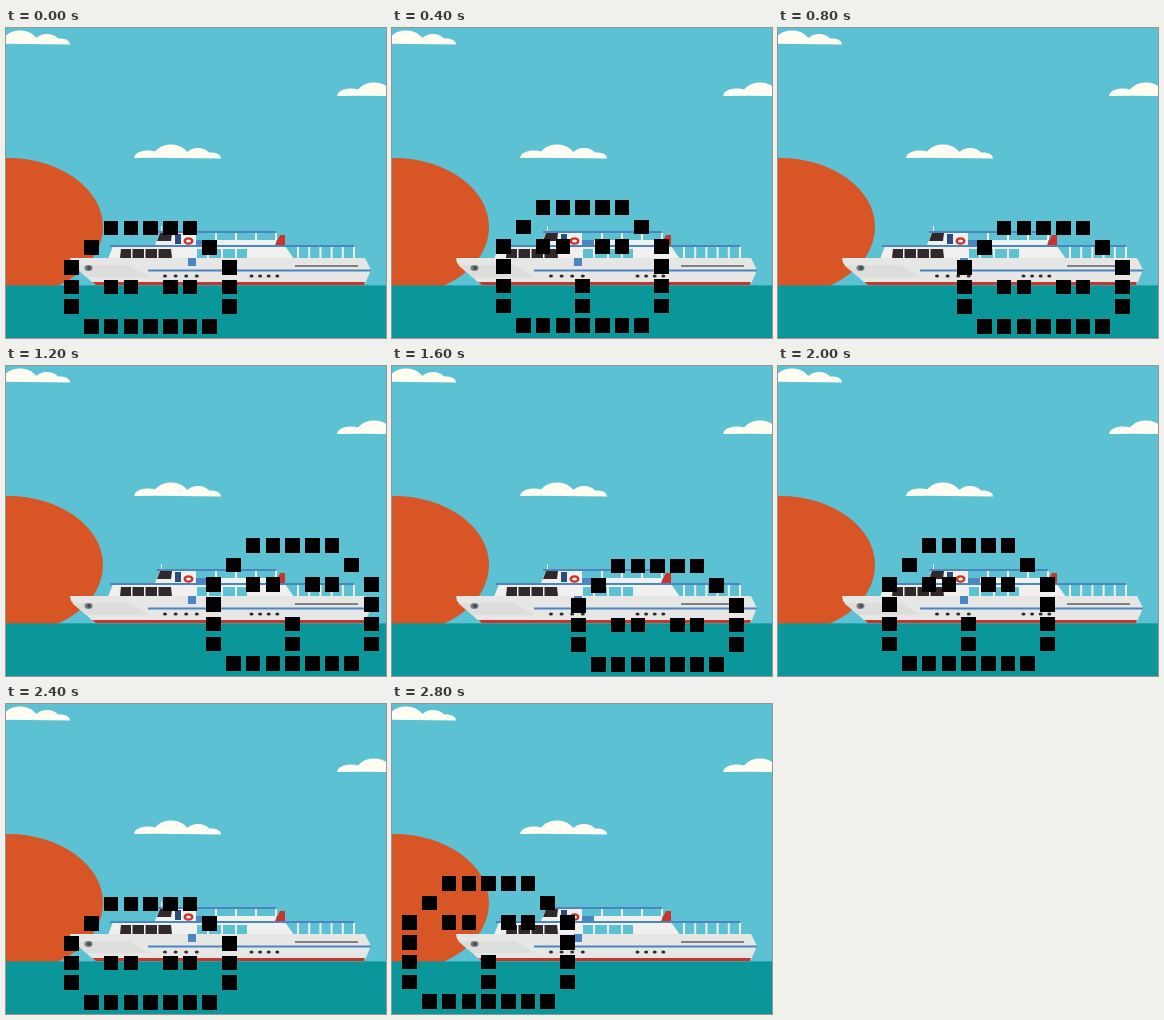
Write an HTML page with a canvas that moves like this. It is 380 px wide and 310 px high and loops after 3.2 s.

```html
<!DOCTYPE html>
<html lang="en">
<head>
<meta charset="utf-8">
<title>Harbour blob</title>
<style>
html, body { margin: 0; width: 100%; height: 100%; overflow: hidden; background: #5bc1d3; }
canvas { display: block; width: 380px; height: 310px; }
</style>
</head>
<body>
<canvas id="stage" width="380" height="310"></canvas>
<script>
const ctx = document.getElementById('stage').getContext('2d');
const SKY = '#5bc1d3', SEA = '#0b9699', WHITE = '#f0f1ef', HULL = '#e6e7e5';
const BLUE = '#4b86c3', RED = '#cc3329', DARK = '#30282b', CREAM = '#fffdf2';

function rect(color, x, y, w, h) {
  ctx.fillStyle = color;
  ctx.fillRect(x, y, w, h);
}

function oval(color, x, y, rx, ry) {
  ctx.fillStyle = color;
  ctx.beginPath();
  ctx.ellipse(x, y, rx, ry, 0, 0, Math.PI * 2);
  ctx.fill();
}

function poly(color, ...points) {
  ctx.fillStyle = color;
  ctx.beginPath();
  for (const [x, y] of points) ctx.lineTo(x, y);
  ctx.fill();
}

// Four-sided shape with level top and bottom edges.
function slab(color, top, x1, x2, bottom, x3, x4) {
  poly(color, [x1, top], [x2, top], [x4, bottom], [x3, bottom]);
}

function repeat(count, from, step, paint) {
  for (let i = 0; i < count; i++) paint(from + i * step);
}

// Outline built from rounded humps over a nearly flat base.
function cloud(x, y) {
  const hump = t => {
    const bump = (mid, width, height) => height * Math.sqrt(Math.max(0, 1 - ((t - mid) / width) ** 2));
    return Math.max(bump(14, 14, 7.5), bump(37, 18, 13.5), bump(64, 13, 10), bump(77, 10, 5.5));
  };
  ctx.fillStyle = CREAM;
  ctx.beginPath();
  ctx.moveTo(x, y - 0.5);
  for (let t = 0; t <= 87; t++) ctx.lineTo(x + t, y - hump(t));
  ctx.lineTo(x + 87, y + 0.5);
  ctx.fill();
}

function topDeck() {
  slab(WHITE, 204, 154, 190, 217, 149, 190);
  rect(WHITE, 190, 212, 80, 6);
  repeat(4, 209, 20, x => rect(WHITE, x, 205, 2, 7));
  slab(DARK, 205, 154, 166, 213, 151, 165);
  rect('#294d7c', 169, 206, 6, 10);
  rect(BLUE, 190, 212, 12, 5);
  rect(BLUE, 151, 203, 119, 2);
  rect(WHITE, 155, 198, 1, 5);
  slab(RED, 207, 274, 279, 217, 269, 279);
  oval(RED, 182.5, 213, 5, 3.8);
  oval(WHITE, 182.5, 213, 2.5, 1.5);
}

function mainDeck() {
  slab(WHITE, 218, 107, 279, 231, 102, 288);
  slab(DARK, 221, 115, 165, 230, 114, 166);
  repeat(3, 125, 13, x => rect(WHITE, x, 221, 1.5, 9));
  rect(SKY, 191, 221, 50, 9);
  repeat(3, 201, 14, x => rect(WHITE, x, 221, 2, 9));
  repeat(6, 291, 11.2, x => rect(WHITE, x, 219, 2, 12));
  rect(BLUE, 104, 217, 244, 2);
}

function hull() {
  poly(HULL, [64, 230], [359, 230], [365, 242], [359, 256], [88, 256], [65, 235]);
  slab('#dcdedc', 237, 66, 122, 249, 80, 143);
  slab(RED, 254, 86, 359, 257, 90, 358);
  rect(BLUE, 142, 241.5, 223, 2);
  rect(BLUE, 182, 230, 8, 8);
  rect('#81817f', 289, 237, 63, 2);
  const porthole = x => oval(DARK, x, 248, 2, 1.5);
  repeat(4, 159, 10.6, porthole);
  repeat(4, 245.5, 8.6, porthole);
  oval('#767d80', 82.5, 240, 4, 3);
  oval('#444b50', 83, 240, 2, 1.8);
}

function scene() {
  rect(SKY, 0, 0, 380, 310);
  oval('#d85625', 2, 199, 95, 69);
  cloud(-23, 16);
  cloud(331, 68);
  cloud(128, 130);
  topDeck();
  mainDeck();
  hull();
  rect(SEA, 0, 257.4, 380, 53);
}

const STEP = 400, STEPS = 8, TURN = 3;
const STOPS = [200, 179, 104, 58, 10];
const COLS = 9, PITCH = 19.72, CELL = 14.6;

// Mirrored outline: a dome, straight sides, a flat base, eyes and, when up, a mouth.
function filled(row, col, rows, up) {
  const d = Math.abs(col - 4);
  const eyes = row === (up ? 2 : 3) && (d === 1 || d === 2);
  const mouth = up && d === 0 && (row === 4 || row === 5);
  if (row === 0) return d <= 2;
  if (row === 1) return d === 3;
  if (row === rows - 1) return d <= 3;
  return d === 4 || eyes || mouth;
}

function cell(x, y) {
  const left = Math.round(x), top = Math.round(y);
  rect('#000', left, top, Math.round(x + CELL) - left, Math.round(y + CELL) - top);
}

function blob(step) {
  const up = step % 2 === 1;
  const rows = up ? 7 : 6;
  const left = STOPS[Math.abs(step - TURN)] + 0.4;
  const top = up ? 171.9 : 192.6;
  for (let row = 0; row < rows; row++) {
    for (let col = 0; col < COLS; col++) {
      if (filled(row, col, rows, up)) cell(left + col * PITCH, top + row * PITCH);
    }
  }
}

const start = performance.now();
function draw() {
  const elapsed = performance.now() - start;
  scene();
  blob(Math.floor(elapsed / STEP) % STEPS);
  requestAnimationFrame(draw);
}
draw();
</script>
</body>
</html>
```
